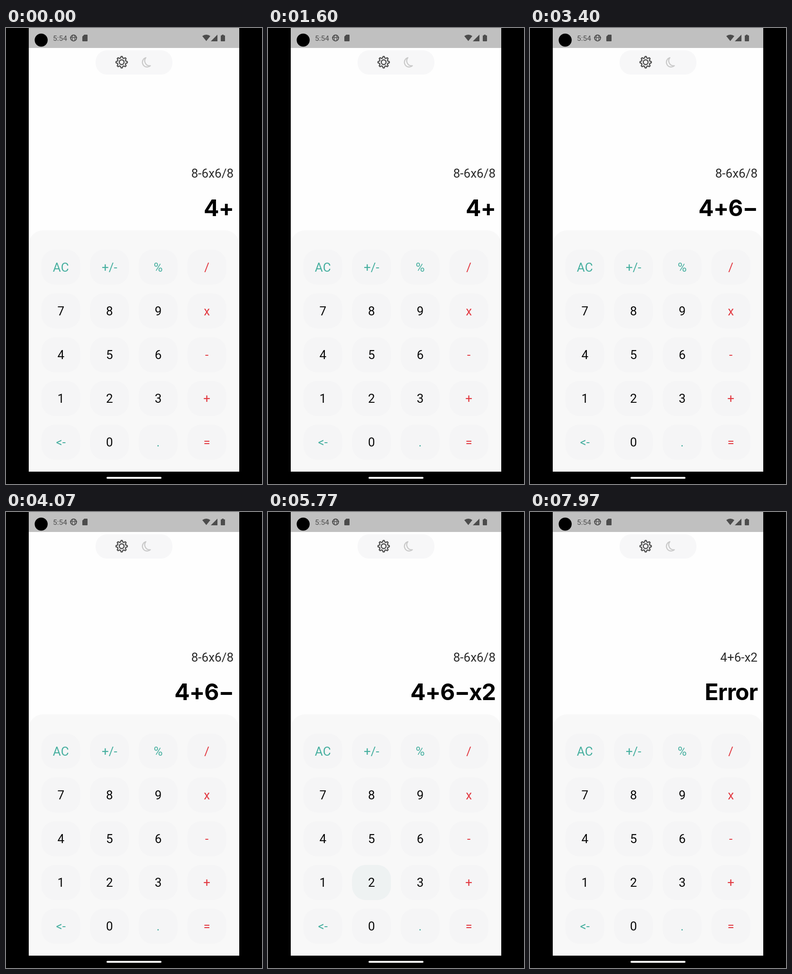
An HTML page that plays this animation: 540x960 px, repeating every 8000 ms.

```html
<!DOCTYPE html>
<html lang="en">
<head>
<meta charset="utf-8">
<title>Calculator</title>
<style>
  html, body { margin: 0; width: 100%; height: 100%; overflow: hidden; background: #000; }
  svg { display: block; width: 100%; height: 100%; font-family: Roboto, sans-serif; }
  .status { fill: #4c4c4c; }
  .key { font-size: 26px; text-anchor: middle; }
  .digit { fill: #0a0a0a; }
  .tool { fill: #46af9f; }
  .operator { fill: #e23a42; }
  #history { font-size: 26px; text-anchor: end; fill: #2b2b2b; }
  #result { font: 700 48px Inter, sans-serif; letter-spacing: -1px; text-anchor: end; fill: #000; }
</style>
</head>
<body>
<svg id="stage" viewBox="0 0 540 960">
  <rect width="540" height="960"/>
  <rect x="48" width="444" height="934" fill="#fefefe"/>
  <rect x="48" width="444" height="42" fill="#c0c0c0"/>
  <circle cx="74.200" cy="25.500" r="13.700"/>

  <g class="status">
    <text x="99" y="27" font-size="15.5">5:54</text>
    <g fill="none" stroke="#4c4c4c" stroke-width="2">
      <circle cx="142.500" cy="21" r="6.200"/>
      <path d="M135 20h15M140 21v6M145 21v6M140 15v4M145 15v4" stroke-width="1.300"/>
    </g>
    <path d="M165 14h6q1 0 1 1v12q0 1-1 1h-9q-1 0-1-1v-9z"/>
    <path d="M414 17q8.500-6 17 0l-8.500 10.500z"/>
    <path d="M446 14v14h-14z"/>
    <path d="M455.500 14h3.500v1.500h2q1 0 1 1v10.500q0 1-1 1h-7q-1 0-1-1v-10.500q0-1 1-1h1.500z"/>
  </g>

  <rect x="189" y="47" width="162" height="51" rx="24" fill="#f7f7f8"/>
  <g fill="none" stroke="#505050" stroke-width="2.400" stroke-linejoin="round">
    <polygon id="gear"/>
    <circle cx="244" cy="72" r="5"/>
  </g>
  <path d="M295 62.500A10 10 0 1 0 304.500 79.500A10.500 10.500 0 0 1 295 62.500Z"
    fill="none" stroke="#c9c9c9" stroke-width="2.300" stroke-linejoin="round"/>

  <text id="history" x="480" y="315"></text>
  <text id="result" x="480" y="395.500"></text>

  <path d="M48 934V456a30 30 0 0 1 30-30h384a30 30 0 0 1 30 30v478z" fill="#f8f8f8"/>
  <g id="keys"></g>
  <rect x="212" y="945" width="116" height="4" rx="2" fill="#fafafa"/>
</svg>
<script>
const LOOP = 8000;
const RIPPLE = 480;
const COLUMNS = [115.7, 218.3, 321, 423.7];
const ROWS = [503.5, 595.5, 688, 780, 872];
const LABELS = ["AC +/- % /", "7 8 9 x", "4 5 6 -", "1 2 3 +", "<- 0 . ="].map(row => row.split(" "));

const steps = [
  { at: 0, history: "8-6x6/8", result: "4+" },
  { at: 1900, history: "8-6x6/8", result: "4+6", key: "6" },
  { at: 2960, history: "8-6x6/8", result: "4+6−", key: "-" },
  { at: 4270, history: "8-6x6/8", result: "4+6−x", key: "x" },
  { at: 5470, history: "8-6x6/8", result: "4+6−x2", key: "2" },
  { at: 6690, history: "4+6-x2", result: "Error", key: "=" }
];

const byId = id => document.getElementById(id);
const clamp = value => Math.min(1, Math.max(0, value));

function add(parent, tag, attributes) {
  const node = document.createElementNS("http://www.w3.org/2000/svg", tag);
  for (const name in attributes) node.setAttribute(name, attributes[name]);
  return parent.appendChild(node);
}

byId("gear").setAttribute("points", Array.from({ length: 32 }, (_, i) => {
  const radius = i % 4 < 2 ? 12 : 9;
  const angle = (i - 0.5) * Math.PI / 16;
  return [244 + radius * Math.cos(angle), 72 + radius * Math.sin(angle)].map(n => n.toFixed(2));
}).join(" "));

const ripples = {};
LABELS.forEach((row, r) => row.forEach((label, c) => {
  const x = COLUMNS[c], y = ROWS[r], keys = byId("keys");
  const shape = { x: x - 41, y: y - 37, width: 82, height: 74, rx: 29 };
  add(keys, "rect", { ...shape, fill: "#f5f5f6" });

  const clipId = `clip-${r}-${c}`;
  add(add(keys, "clipPath", { id: clipId }), "rect", shape);
  const group = add(keys, "g", { "clip-path": `url(#${clipId})` });
  ripples[label] = add(group, "circle", { cx: x + 1, cy: y - 5, r: 0, fill: "#d6e6e6", opacity: 0 });

  const kind = c === 3 ? "operator" : /^\d$/.test(label) ? "digit" : "tool";
  add(keys, "text", { x, y: y + 9, class: `key ${kind}` }).textContent = label;
}));

function draw(time) {
  const current = steps.filter(step => step.at <= time).pop();
  byId("history").textContent = current.history;
  byId("result").textContent = current.result;

  for (const { at, key } of steps) {
    if (!key) continue;
    const age = time - at + 60;
    const spread = clamp(age / 300);
    const visible = age >= 0 && age < RIPPLE;
    ripples[key].setAttribute("r", 8 + 52 * spread ** 1.3);
    ripples[key].setAttribute("opacity", visible ? 0.65 * (1 - clamp((age - 150) / (RIPPLE - 150))) : 0);
  }
}

const start = performance.now();
function tick() {
  draw((performance.now() - start) % LOOP);
  requestAnimationFrame(tick);
}
tick();
</script>
</body>
</html>
```
